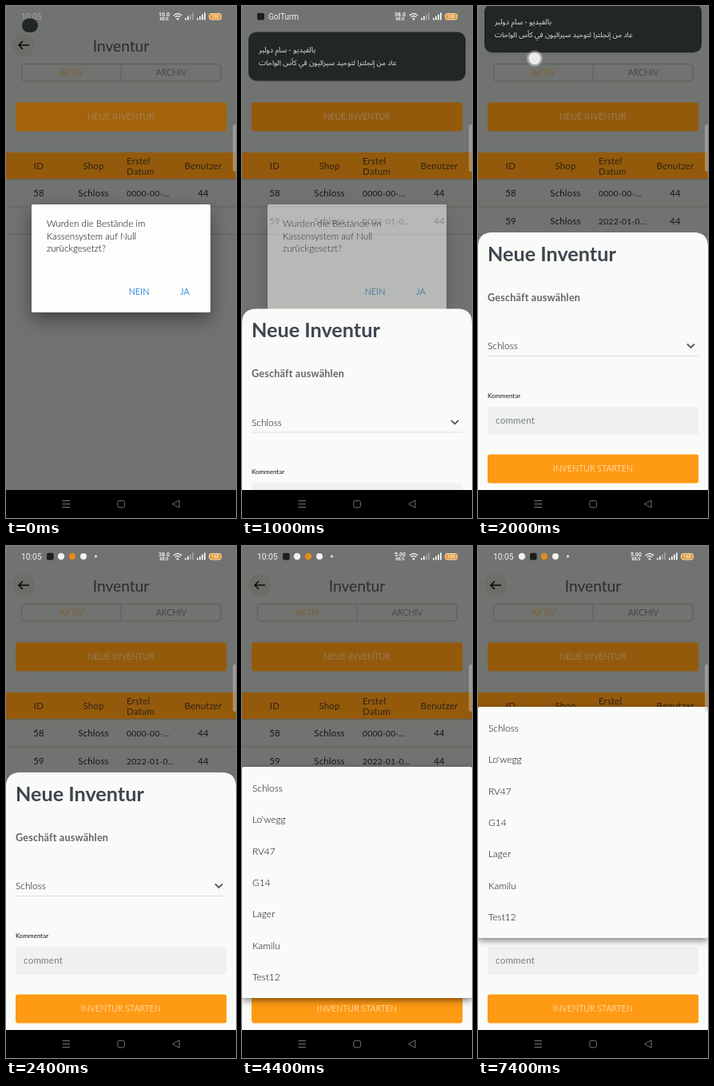
These frames come from a looping animation (288 px wide and 640 px high, 8000 ms). An HTML page:

```html
<!DOCTYPE html>
<html lang="de">
<head>
<meta charset="utf-8">
<title>Inventur</title>
<style>
  html, body { margin: 0; width: 100%; height: 100%; overflow: hidden; background: #000; }
  svg { display: block; width: 288px; height: 640px; font-family: Lato, "Open Sans", sans-serif; }
  .thin { font-weight: 300; font-size: 10.7px; }
  .cell { font-size: 11.4px; letter-spacing: .2px; }
  .date { font-size: 10.4px; letter-spacing: .2px; }
  .item { font-size: 11.9px; font-weight: 300; fill: #080808; }
  .arabic { font-family: "Noto Sans Arabic", "DejaVu Sans", sans-serif; fill: #e4e6e3; }
  .status { font-family: Roboto, sans-serif; fill: #f2f3f1; }
  .dialog { filter: drop-shadow(0 9px 11px rgba(0, 0, 0, .4)); }
  .menu { filter: drop-shadow(0 3px 4px rgba(0, 0, 0, .5)); }
</style>
</head>
<body>
<svg id="stage" viewBox="0 0 288 640"></svg>
<script>
const LOOP = 8000, STEP = 100;
const ORANGE = '#ff9a14', PAPER = '#f9fbf8', DIM = .42;
const SHOPS = ['Schloss', "Lo'wegg", 'RV47', 'G14', 'Lager', 'Kamilu', 'Test12'];
const PITCH = 39.4, MENU_H = 289, ANCHOR = 405;

const attrs = o => Object.entries(o).map(([k, v]) => `${k}="${v}"`).join(' ');
const rect = (x, y, width, height, fill, more = {}) =>
  `<rect ${attrs({ x, y, width, height, fill, ...more })}/>`;
const circle = (cx, cy, r, fill, more = {}) => `<circle ${attrs({ cx, cy, r, fill, ...more })}/>`;
const path = (d, stroke, width = 1, more = {}) =>
  `<path ${attrs({ d, stroke, 'stroke-width': width, fill: 'none', ...more })}/>`;
const text = (s, x, y, more = {}) => `<text ${attrs({ x, y, ...more })}>${s}</text>`;
const mid = (s, x, y, more = {}) => text(s, x, y, { 'text-anchor': 'middle', ...more });
const group = (id, body, more = {}) => `<g ${attrs({ id, ...more })}>${body}</g>`;

const slab = (y, more = {}) => rect(12, y, 264.2, 36, ORANGE, { rx: 3, ...more });
const button = (label, y) => slab(y) + mid(label, 144, y + 21.8, { class: 'thin', fill: '#fff' });

const row = (id, date, y) => {
  const cell = { class: 'cell', fill: '#262626' };
  return mid(id, 41, y, cell) + mid('Schloss', 109.5, y, cell) +
    text(date, 151, y, { class: 'date', fill: '#262626' }) +
    mid('44', 247, y, cell) + path(`M0 ${y + 12.8}H288`, '#a3a7a0');
};

function page() {
  const head = { class: 'cell', fill: '#4a3a22' };
  return rect(0, 0, 288, 605, '#c1c5be') +
    circle(22, 49, 14, '#b8bcb5') +
    path('M29 49H16M21 44L16 49L21 54', '#111', 1.6) +
    mid('Inventur', 144, 56.5, { 'font-size': 19.2, fill: '#4a4c52' }) +
    rect(19.5, 72.5, 249.5, 21.5, 'none', { rx: 4, stroke: '#9c9f99' }) +
    path('M144 72.5V94', '#9c9f99') +
    mid('AKTIV', 82, 87.3, { class: 'thin', fill: '#f08800' }) +
    mid('ARCHIV', 207, 87.3, { class: 'thin', fill: '#444' }) +
    button('NEUE INVENTUR', 120.6) +
    rect(0, 183, 288, 33, ORANGE) + path('M0 216.5H288', '#a59f93') +
    mid('ID', 41, 204, head) + mid('Shop', 109.5, 204, head) +
    text('Erstel', 151, 198, head) + text('Datum', 151, 211, head) +
    mid('Benutzer', 247, 204, head) +
    row('58', '0000-00-…', 238) + row('59', '2022-01-0…', 272.5);
}

function dialog() {
  const line = { 'font-size': 11.6, 'font-weight': 300, fill: '#000' };
  const blue = { 'font-size': 10.8, fill: '#3d8fdf' };
  return rect(32, 248, 224, 135, '#fdfefc', { rx: 2, class: 'dialog' }) +
    ['Wurden die Bestände im', 'Kassensystem auf Null', 'zurückgesetzt?']
      .map((s, i) => text(s, 51, 276 + i * 15.6, line)).join('') +
    mid('NEIN', 166.5, 361, blue) + mid('JA', 224, 361, blue);
}

function sheet() {
  return path('M0 605V301Q0 283 18 283H270Q288 283 288 301V605Z', 'none', 0, { fill: PAPER }) +
    text('Neue Inventur', 12, 318.5, { 'font-size': 25.2, 'font-weight': 700, fill: '#41454e' }) +
    text('Geschäft auswählen', 12, 368.5, { 'font-size': 12.6, 'font-weight': 700, 'letter-spacing': .2, fill: '#62656a' }) +
    text('', 12, 429.3, { id: 'choice', class: 'item' }) +
    path('M262 422.5L266.5 427L271 422.5', '#555', 1.8) +
    path('M12 437.5H276', '#dcdedb') +
    text('Kommentar', 12, 490, { 'font-size': 8, fill: '#111' }) +
    rect(12, 501, 264, 35, '#eff1ee', { rx: 4 }) +
    text('comment', 22, 522.2, { 'font-size': 11.5, 'letter-spacing': .25, fill: '#777b80' }) +
    button('INVENTUR STARTEN', 560.6);
}

const menu = () =>
  `<clipPath id="menuClip">${rect(0, 0, 288, MENU_H, '#000', { id: 'menuMask' })}</clipPath>` +
  rect(0, 0, 288, MENU_H, PAPER, { id: 'menuBox', rx: 2, class: 'menu' }) +
  group('menuItems', SHOPS.map((s, i) => text(s, 13, 30.7 + i * PITCH, { class: 'item' })).join(''),
    { 'clip-path': 'url(#menuClip)' });

const bars = (x, lit) => [0, 1, 2, 3].map(i =>
  rect(x + i * 3, 15 - i * 2.2, 1.8, 2.4 + i * 2.2, '#f2f3f1', { opacity: i < lit ? 1 : .35 })).join('');

function statusBar() {
  const rate = { class: 'status', 'font-weight': 700 };
  const small = (s, x, y, size) => mid(s, x, y, { ...rate, 'font-size': size });
  return group('clock', text('10:05', 19, 16.7, { class: 'status', 'font-size': 10.3 })) +
    group('icons',
      rect(-4, 8.8, 8.6, 8.6, '#1d1f1d', { id: 'iconA', rx: 2 }) +
      circle(0, 13, 4.2, '#f2f3f1', { id: 'iconB' }) +
      circle(83, 13, 4.2, '#e28a1c') + circle(97, 13, 4, '#f2f3f1') +
      circle(112.5, 13, 1.4, '#f2f3f1')) +
    group('ticker', rect(19, 8.8, 9, 8.8, '#1d1f1d', { rx: 2 }) +
      text('GolTurm', 33, 16.8, { class: 'status', 'font-size': 10 })) +
    group('signals',
      mid('', 198, 12.6, { ...rate, id: 'rate', 'font-size': 7 }) + small('KB/S', 198, 18, 4.8) +
      path('M209.8 12Q215 7.2 220.2 12M211.8 14Q215 11 218.2 14', '#f2f3f1', 1.4) +
      circle(215, 16.2, 1.3, '#f2f3f1') + bars(224, 2) + bars(239, 4) +
      rect(254.5, 9.5, 15, 7.5, '#e79a35', { rx: 2.5, stroke: '#f5dfba' }) +
      small('100', 262, 15.2, 5.4));
}

const navBar = () => rect(0, 605, 288, 35, '#000') +
  path('M70.5 618.5H80M70.5 622.5H80M70.5 626.5H80', '#747474') +
  rect(139.8, 618.3, 8.6, 8.6, 'none', { rx: 2, stroke: '#747474' }) +
  path('M208.5 622.5L217 617.8V627.2Z', '#747474');

const banner = () => rect(0, 0, 0, 0, '#232724', { id: 'card' }) +
  group('cardText',
    text('بالفيديو - سام دولبر', 21, 58, { class: 'arabic', 'font-size': 9.4 }) +
    text('عاد من إنجلترا لتوحيد سيراليون في كأس الواحات', 21, 74, { class: 'arabic', 'font-size': 9.05 }));

document.getElementById('stage').innerHTML =
  page() + rect(0, 0, 288, 605, '#000', { opacity: DIM }) + slab(120.6, { id: 'press' }) +
  group('dialog', dialog()) + group('sheet', sheet()) + group('menu', menu()) +
  statusBar() + navBar() + group('banner', banner()) +
  rect(284, 148, 10, 59, '#c8cac7', { rx: 3, opacity: .45 }) +
  group('touch', circle(0, 0, 10, '#fff', { opacity: .35 }) + circle(0, 0, 7.5, '#f4f5f3', { opacity: .9 }));

const el = {};
document.querySelectorAll('[id]').forEach(n => el[n.id] = n);

const ramp = (t, a, b) => Math.min(1, Math.max(0, (t - a) / (b - a)));
const ease = p => 1 - (1 - p) ** 3;
const mix = (a, b, p) => a + (b - a) * p;
const set = (n, o) => { for (const k in o) n.setAttribute(k, o[k]); };
const fade = (n, opacity) => set(n, { opacity });
const move = (n, x, y) => set(n, { transform: `translate(${x} ${y})` });

function drawBanner(t) {
  const grow = ease(ramp(t, 0, 500)), up = ramp(t, 1800, 2200) ** 1.5;
  set(el.card, {
    x: mix(20, 8, grow), y: mix(15.5, 32.5, grow),
    width: mix(20, 272, grow), height: mix(17.5, 61, grow), rx: mix(8.7, 10, grow)
  });
  fade(el.cardText, ramp(t, 150, 450));
  move(el.banner, 0, -100 * up);
  // the finger that flicks the banner away
  fade(el.touch, t >= 1700 && t < 2100 ? 1 : 0);
  move(el.touch, 71, mix(113, 40, ramp(t, 1700, 2100) ** 1.5));
}

function drawStatus(t) {
  const back = ramp(t, 2100, 2400), swapped = t >= 5200;
  fade(el.clock, t < 100 ? .4 : back);
  fade(el.icons, back);
  fade(el.ticker, ramp(t, 150, 400) * (1 - ramp(t, 2000, 2200)));
  fade(el.signals, 1 - ramp(t, 1600, 1800) + back);
  el.rate.textContent = t < 700 ? '10.0' : t < 4000 ? '38.0' : '5.00';
  move(el.iconA, swapped ? 69 : 55, 0);
  move(el.iconB, swapped ? 55 : 69, 0);
}

function drawMenu(t) {
  const second = t >= 6000, top = second ? 201 : 276, from = second ? 6300 : 3100;
  const open = ease(ramp(t, from, from + 400));
  const box = { y: mix(ANCHOR - top, 0, open), height: mix(40, MENU_H, open) };
  set(el.menuBox, box);
  set(el.menuMask, box);
  fade(el.menu, second ? open : open * (1 - ramp(t, 5100, 5400)));
  move(el.menu, 0, top);
}

function draw(t) {
  fade(el.press, .14 * (1 - ramp(t, 0, 500)));
  fade(el.dialog, 1 - ramp(t, 900, 1100));
  move(el.sheet, 0, 322 * (1 - ease(ramp(t, 900, 1200))));
  el.choice.textContent = SHOPS[t < 5200 ? 0 : 5];
  drawBanner(t);
  drawStatus(t);
  drawMenu(t);
}

const start = performance.now();
function tick() {
  const t = (performance.now() - start) % LOOP;
  draw(Math.floor(t / STEP) * STEP);
  requestAnimationFrame(tick);
}
tick();
</script>
</body>
</html>
```
